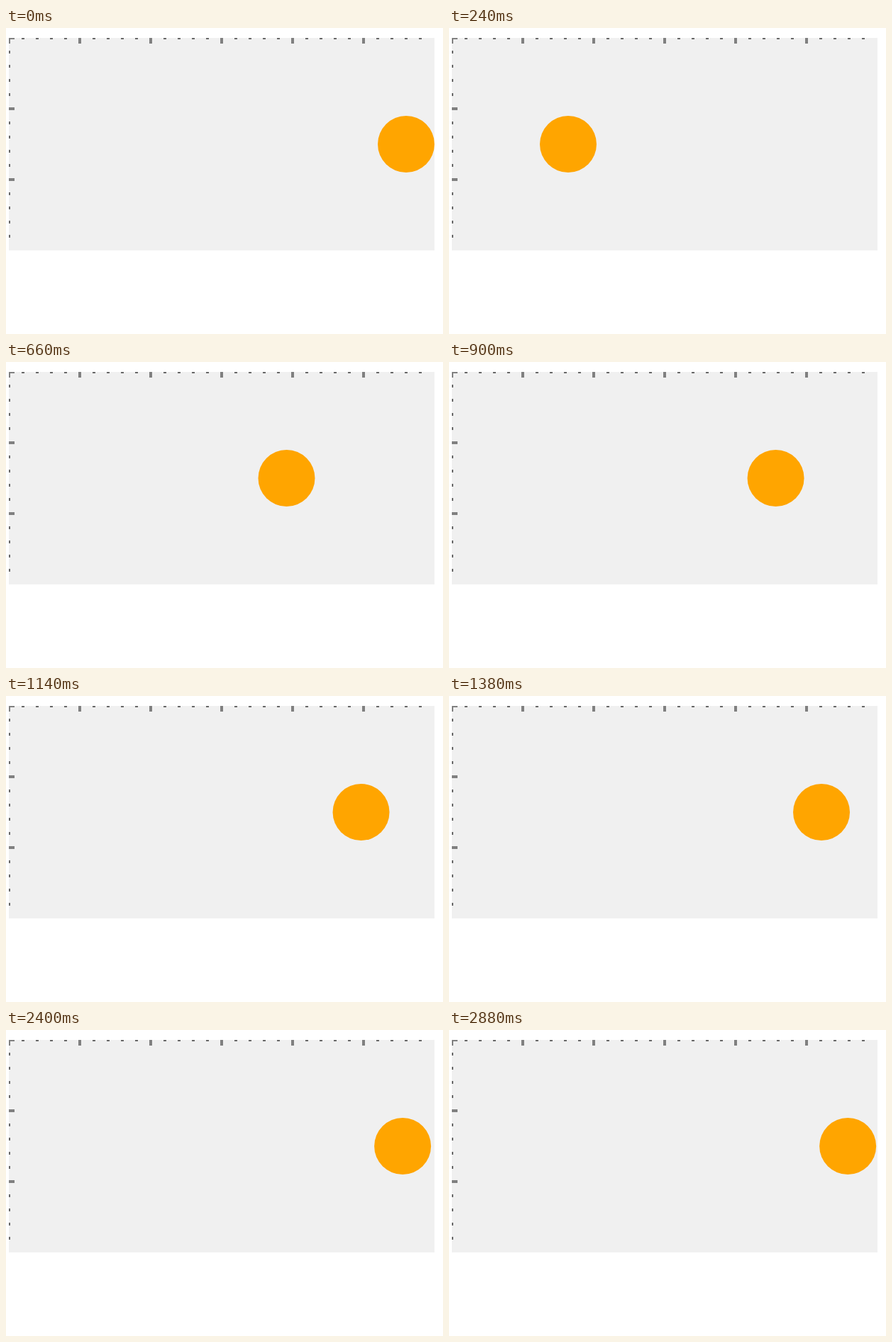
These frames come from a looping animation (616x432 px, 2.94 s). An HTML page:

```html
<!DOCTYPE html>
<html>
<head>
<meta charset="utf-8">
<style>
html, body { margin: 0; width: 100%; height: 100%; overflow: hidden; background: #fff; }
svg { display: block; }
</style>
</head>
<body>
<svg width="616" height="432">
  <svg id="panel" x="4" y="14" width="600" height="300" overflow="hidden">
    <rect width="600" height="300" fill="#f0f0f0"/>
    <g id="ticks"></g>
    <circle id="ball" cx="560" cy="150" r="40" fill="#ffa500"/>
  </svg>
</svg>
<script>
const LOOP = 2940, STEP = 60, START = 120;
const END_X = 560, DISTANCE = 505.5, DECAY = 0.8851;
const ball = document.getElementById('ball');

// Ruler marks every 20 px, a long one every 100 px
let marks = '';
for (let p = 0; p < 600; p += 20) {
  const long = p % 100 === 0;
  const size = long ? 8 : 2;
  const fill = long ? '#808080' : '#686868';
  marks += `<rect x="${p - 2}" width="4" height="${size}" fill="${fill}"/>`;
  if (p < 300) marks += `<rect y="${p - 2}" width="${size}" height="4" fill="${fill}"/>`;
}
document.getElementById('ticks').innerHTML = marks;

// Each step closes a fixed share of the remaining distance
function ballX(t) {
  if (t < START) return END_X;
  return END_X - DISTANCE * DECAY ** Math.floor((t - START) / STEP);
}

const begin = performance.now();
function draw() {
  ball.setAttribute('cx', ballX((performance.now() - begin) % LOOP));
  requestAnimationFrame(draw);
}
draw();
</script>
</body>
</html>
```
